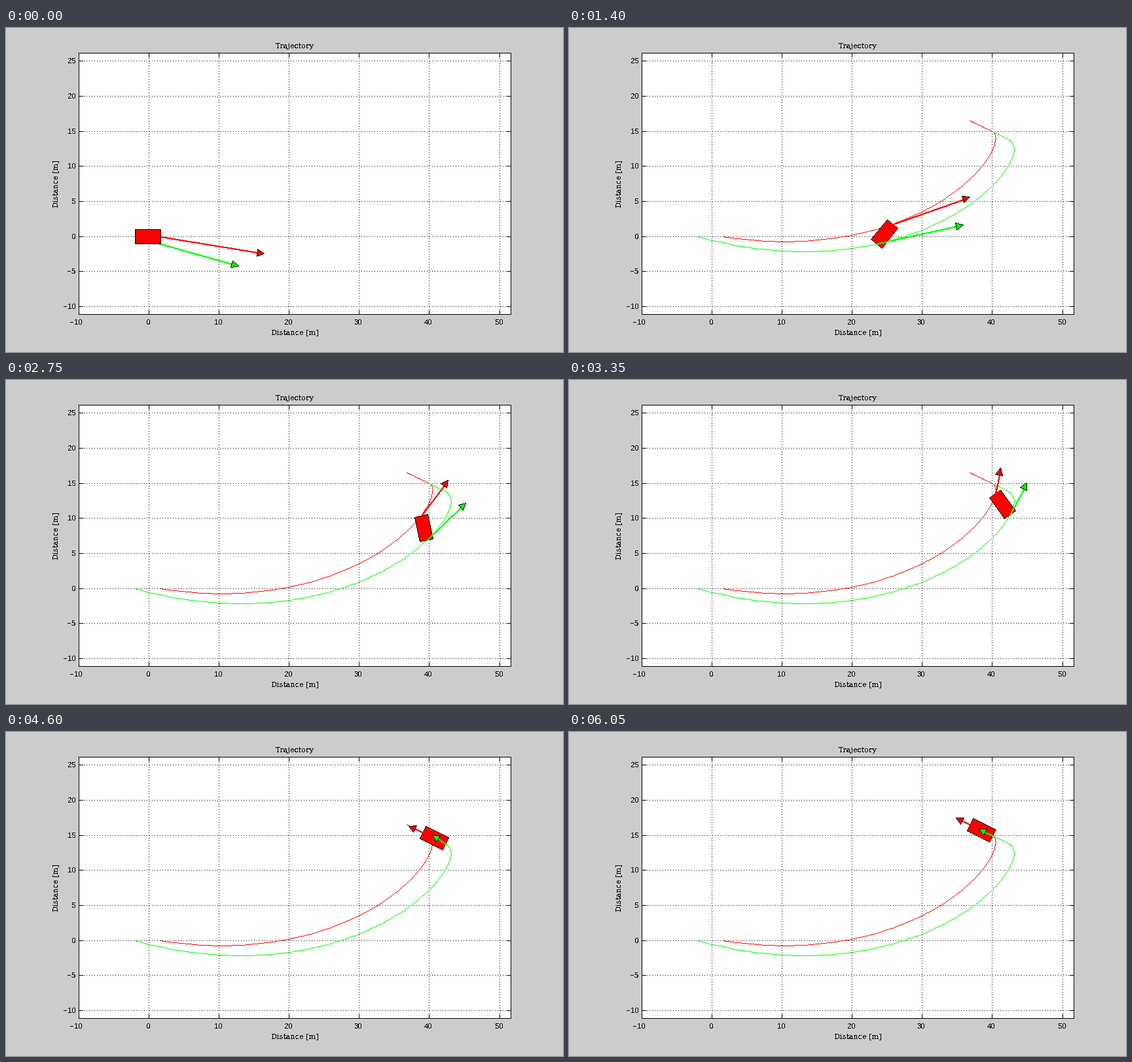
A matplotlib script for the animation above (6.1 s loop, 851 by 496 pixels).

```python
import numpy as np
import matplotlib.pyplot as plt
from matplotlib.animation import FuncAnimation
from matplotlib.collections import PolyCollection
from matplotlib.patches import Polygon, Rectangle

W, H, DPI = 851, 496, 100
PX = 72 / DPI                        # one pixel in points
FRAMES, STEP, SUB = 122, 50, 10
LEFT, RIGHT, TOP, BOTTOM = 111, 771, 38, 438
RED, GREEN = "#ff0000", "#00ff00"
FRONT, REAR, HALF = 18, 20.8, 10.5   # car size around its centre of mass
GAIN = 13.87                         # arrow length per pixel of speed

# Sliding car, in pixels and frames
START, SPEED = (218, 319), (10.63, 2.338)
YAW = np.radians(1.897)
GRIP, DRAG, SOFT = 0.2018, 0.0045, 0.7
EASE_FROM, EASE_TO = 68.2, 94.2      # the spin fades out here


def axes_of(angle):
    """Unit vectors forward and to the left, with y pointing down."""
    c, s = np.cos(angle), np.sin(angle)
    return np.array([c, -s]), np.array([-s, -c])


def spin(t):
    return YAW * np.clip((EASE_TO - t) / (EASE_TO - EASE_FROM), 0, 1)


def simulate():
    """Side friction stops the slide until the car rolls along its heading."""
    pos, vel, angle = np.array(START, float), np.array(SPEED), 0.0
    h = 1 / SUB
    states = []
    for i in range((FRAMES - 1) * SUB):
        t = i * h
        if i % SUB == 0:
            states.append((pos, vel, angle, spin(t)))
        turn = spin(t + h / 2) * h
        ahead, left = axes_of(angle + turn / 2)
        slip = np.tanh(-(vel @ left) / SOFT)
        new = vel + h * slip * (GRIP * left - DRAG * ahead)
        pos = pos + h * (vel + new) / 2
        vel, angle = new, angle + turn
    return states[:1] + states       # the first pose is held once


def pose(pos, vel, angle, rate):
    """Car corners, then position and velocity of the front and the rear."""
    ahead, left = axes_of(angle)
    front, rear = pos + FRONT * ahead, pos - REAR * ahead
    side = HALF * left
    corners = np.array([front + side, front - side, rear - side, rear + side])
    return (corners, (front, vel + rate * FRONT * left),
            (rear, vel - rate * REAR * left))


def trace(points):
    """Whole pixels along a polyline."""
    pts = np.rint(points)
    runs = [np.rint(np.linspace(a, b, int(np.abs(b - a).max()) + 1))
            for a, b in zip(pts, pts[1:])]
    return np.concatenate(runs)


def squares(pixels, size=1):
    lo, hi = -0.5, size - 0.5
    box = np.array([(lo, lo), (hi, lo), (hi, hi), (lo, hi)])
    return np.asarray(pixels)[:, None] + box


fig = plt.figure(figsize=(W / DPI, H / DPI), dpi=DPI, facecolor="#cccccc")
ax = fig.add_axes([0, 0, 1, 1])
ax.set(xlim=(-0.5, W - 0.5), ylim=(H - 0.5, -0.5))
ax.axis("off")


def ink(color="k", z=1, points=None):
    """Crisp line made of single pixels."""
    verts = [] if points is None else squares(trace(points))
    c = PolyCollection(verts, facecolors=color, edgecolors="none",
                       linewidths=0, antialiaseds=False, zorder=z)
    return ax.add_collection(c, autolim=False)


def label(x, y, text, size=11.25, font="DejaVu Serif", **kw):
    kw = {"ha": "center", "va": "baseline", **kw}
    ax.text(x, y, text, fontsize=size * PX, family=font, antialiased=False, **kw)


def tick_label(x, y, value, **kw):
    label(x, y, str(value).replace("-", "\u2212"), 11.5, "Liberation Sans", **kw)


def draw_axes():
    ax.add_patch(Rectangle((LEFT - 0.5, TOP - 0.5), RIGHT - LEFT + 1,
                           BOTTOM - TOP + 1, fc="w", lw=0, antialiased=False,
                           zorder=0))
    ink(points=[(LEFT, TOP), (RIGHT, TOP), (RIGHT, BOTTOM), (LEFT, BOTTOM),
                (LEFT, TOP)])
    dots = []
    for m in range(-10, 51, 10):
        x = round(218 + 10.71 * m)
        dots += [(x, y) for y in range(BOTTOM, TOP, -4)]
        ink(points=[(x, BOTTOM), (x, BOTTOM - 6)])
        ink(points=[(x, TOP), (x, TOP + 6)])
        tick_label(x - (4 if m < 0 else 1), 453, m)
    for m in range(-10, 26, 5):
        y = round(318.7 - 10.73 * m)
        dots += [(x, y) for x in range(LEFT, RIGHT, 4)]
        ink(points=[(LEFT, y), (LEFT + 6, y)])
        ink(points=[(RIGHT, y), (RIGHT - 6, y)])
        tick_label(106.5, y + 3, m, ha="right")
    ink().set_verts(squares(dots))
    label(440.5, 30, "Trajectory")
    label(441, 469, "Distance [m]")
    label(81, 238, "Distance [m]", rotation=90, ha="right", va="center")


class Shape:
    """Filled polygon with a one-pixel black outline."""

    def __init__(self, color):
        self.fill = ax.add_patch(Polygon([(0, 0)] * 3, fc=color, lw=0))
        self.edge = ink()

    def set(self, corners, z):
        self.fill.set_xy(corners)
        self.fill.set_zorder(z)
        self.edge.set_verts(squares(trace([*corners, corners[0]])))
        self.edge.set_zorder(z + 0.1)


class Arrow:
    def __init__(self, color):
        self.shaft = ink(color)
        self.head = Shape(color)

    def set(self, start, vel, z):
        end = start + GAIN * vel
        d = vel / np.hypot(*vel)
        n = np.array([-d[1], d[0]])
        self.shaft.set_verts(squares(trace([start, end]), 2))
        self.shaft.set_zorder(z)
        self.head.set([end + 11 * d, end + 5.5 * n, end - 5.5 * n], z + 0.2)


draw_axes()
track = [pose(*s) for s in simulate()]
paths = [ink(color, 2, [p[k][0] for p in track])
         for k, color in ((1, RED), (2, GREEN))]
car = Shape(RED)
arrows = [Arrow(RED), Arrow(GREEN)]


def update(n):
    corners, *ends = track[n]
    car.set(corners, 4)
    for path in paths:
        path.set_visible(n > 0)
    for arrow, (pos, vel) in zip(arrows, ends):
        arrow.set(pos, vel, 5 if n else 3)
    return [car.fill]


anim = FuncAnimation(fig, update, frames=FRAMES, interval=STEP, repeat=True,
                     repeat_delay=0, blit=False)
plt.show()
```
